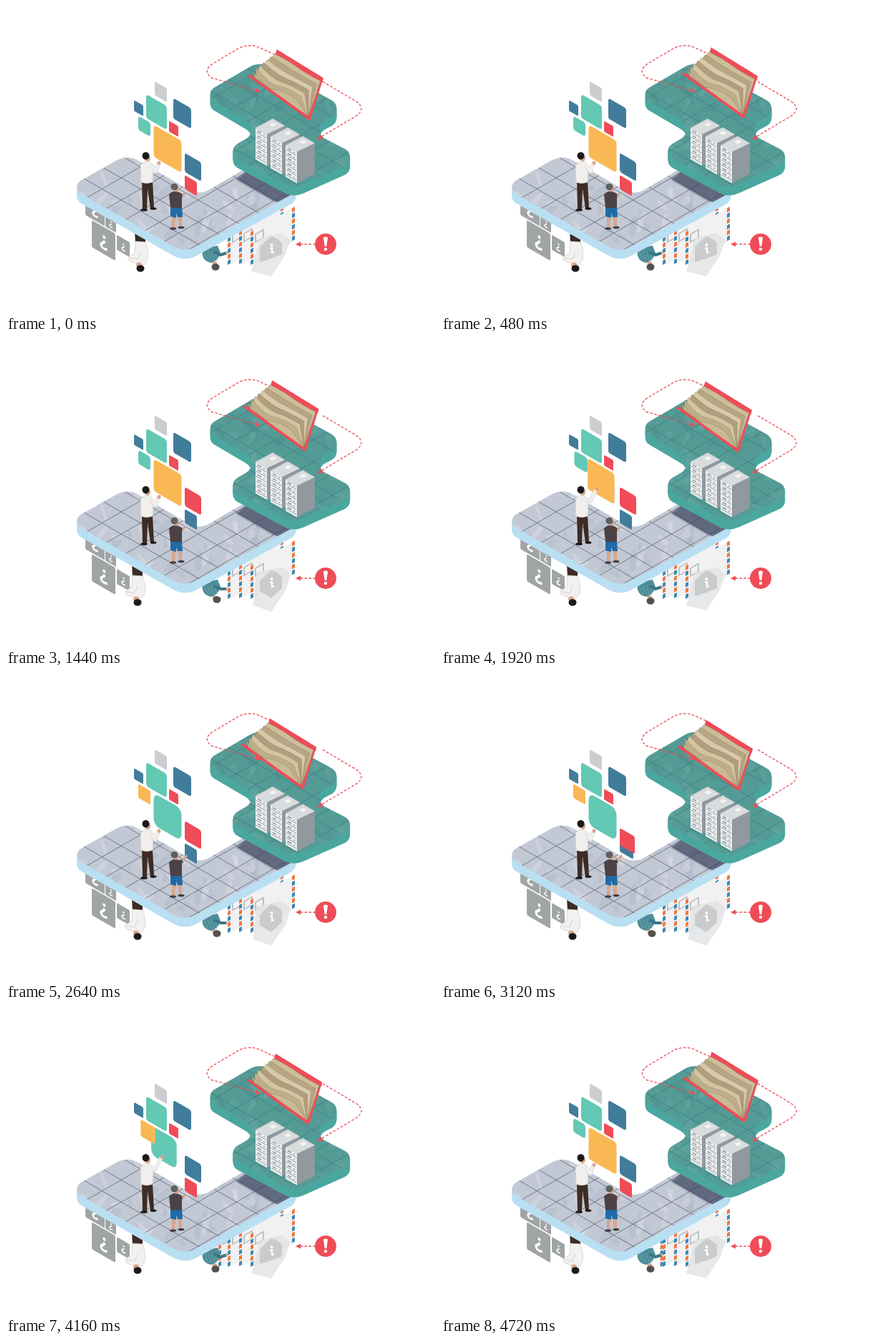
Write an HTML page with a canvas that moves like this. It is 600 px wide and 429 px high and loops after 4.8 s.

```html
<!DOCTYPE html>
<html lang="en">
<head>
<meta charset="utf-8">
<title>Isometric platforms</title>
<style>
html, body { margin: 0; width: 100%; height: 100%; overflow: hidden; background: #fff; }
canvas { display: block; }
</style>
</head>
<body>
<canvas id="stage" width="600" height="429"></canvas>
<script>
const ctx = document.getElementById('stage').getContext('2d');
const LOOP = 4800, STEP = 80, SLOPE = 0.577;
const TEAL = '#63c8b4', BLUE = '#427c9b', RED = '#ef4c57', ORANGE = '#fab854', SKIN = '#d9a58b';

const mix = (a, b, p) => a + (b - a) * p;
const mixAll = (a, b, p) => a.map((v, i) => mix(v, b[i], p));
const smooth = (t, a, b) => {
  const u = Math.min(1, Math.max(0, (t - a) / (b - a)));
  return u * u * (3 - 2 * u);
};
const bump = (t, a, b) => smooth(t, a, a + 240) - smooth(t, b, b + 240);

function seeded(seed) {
  return () => (seed = (seed * 16807) % 2147483647) / 2147483647;
}

function poly(points, fill, stroke, width = 1) {
  ctx.beginPath();
  points.forEach(([x, y]) => ctx.lineTo(x, y));
  ctx.closePath();
  if (fill) { ctx.fillStyle = fill; ctx.fill(); }
  if (stroke) { ctx.strokeStyle = stroke; ctx.lineWidth = width; ctx.stroke(); }
}

function line(points, color, width, dash = []) {
  ctx.beginPath();
  points.forEach(([x, y]) => ctx.lineTo(x, y));
  ctx.strokeStyle = color;
  ctx.lineWidth = width;
  ctx.lineJoin = 'round';
  ctx.setLineDash(dash);
  ctx.stroke();
  ctx.setLineDash([]);
}

function oval(x, y, rx, ry, fill, turn = 0) {
  ctx.beginPath();
  ctx.ellipse(x, y, rx, ry, turn, 0, 7);
  ctx.fillStyle = fill;
  ctx.fill();
}

function shape(d, fill, stroke) {
  const path = new Path2D(d);
  if (fill) { ctx.fillStyle = fill; ctx.fill(path); }
  if (stroke) { ctx.strokeStyle = stroke; ctx.lineWidth = 0.8; ctx.stroke(path); }
}

// Corners are [x, y, radius]
function rounded(corners) {
  const path = new Path2D(), n = corners.length;
  const [a, b] = [corners[n - 1], corners[0]];
  path.moveTo((a[0] + b[0]) / 2, (a[1] + b[1]) / 2);
  corners.forEach(([x, y, r], i) => {
    const next = corners[(i + 1) % n];
    path.arcTo(x, y, next[0], next[1], r);
  });
  path.closePath();
  return path;
}

// Upright square seen in isometric view
function tile([x, y, w], color, round = 0.12, label) {
  ctx.save();
  ctx.transform(1, SLOPE, 0, 1.155, x, y);
  ctx.beginPath();
  ctx.roundRect(0, 0, w, w, w * round);
  ctx.fillStyle = color;
  ctx.fill();
  if (label) {
    ctx.font = `bold ${w * 0.72}px "Open Sans", sans-serif`;
    ctx.textAlign = 'center';
    ctx.fillStyle = '#fff';
    ctx.fillText(label, w / 2, w * 0.7);
  }
  ctx.restore();
}

const floor = rounded([[88, 254, 11], [170, 208, 30], [270, 266, 28], [352, 218, 8],
  [424, 251, 15], [250, 346, 32]]);
const deck = rounded([[275, 124, 11], [355, 77, 30], [477, 144, 13], [421, 173, 15],
  [498, 213, 13], [402, 256, 32], [305, 204, 12], [358, 173, 15]]);

function platform(path, look) {
  ctx.save();
  ctx.fillStyle = look.side;
  ctx.translate(0, 13);
  for (let i = 0; i < 13; i++) { ctx.fill(path); ctx.translate(0, -1); }
  ctx.fillStyle = look.top;
  ctx.fill(path);
  ctx.clip(path);
  const rnd = seeded(look.seed);
  for (let i = 0; i < 260; i++) {
    oval(90 + rnd() * 410, 70 + rnd() * 280, 4 + rnd() * 12, 2 + rnd() * 4,
      rnd() < 0.5 ? look.light : look.dark, rnd() * 3);
  }
  for (let c = -300; c < 800; c += 31) {
    for (const s of [-SLOPE, SLOPE]) {
      line([[0, c + look.shift], [600, c + look.shift + s * 600]], look.grid, look.width);
    }
  }
  if (look.shadow) {
    ctx.filter = 'blur(1px)';
    shape('M322 243 L340 229 L425 240 L425 258 L388 274 Q380 277 372 272 Z', 'rgba(56,64,92,.7)');
  }
  ctx.restore();
}

function server(x, y) {
  const at = points => points.map(([a, b]) => [x + a, y + b]);
  poly(at([[0, 13], [24, 0], [41, 10], [16, 22]]), '#d9dcdd', '#c3c7c9', 0.6);
  poly(at([[16, 22], [41, 10], [41, 53], [16, 66]]), '#8f999f');
  poly(at([[0, 13], [16, 22], [16, 66], [0, 57]]), '#eceeee');
  for (let i = 0; i < 6; i++) {
    const h = 17 + i * 7;
    line(at([[1, h + 2], [15, h + 10]]), '#a4abb0', 1.1);
    line(at([[3, h], [8, h + 3]]), '#7d868c', 1.3);
    line(at([[11, h + 5], [13, h + 6]]), '#8f989e', 1.2);
  }
  poly(at([[19, 8], [25, 5], [30, 8], [24, 11]]), '#f2f3f3');
}

function book(x, y) {
  ctx.save();
  ctx.translate(x, y);
  poly([[0, 0], [65, 40], [47, 99], [-14, 50]], '#e9525c');
  poly([[0, 0], [65, 40], [64, 46], [-2, 6]], RED);
  poly([[-41, 37], [-37, 35], [47, 94], [45, 99]], RED);
  const shades = ['#cdbd9b', '#b7a684', '#d8caa9', '#b09e7d', '#d3c4a2', '#bfae8b', '#c9b995'];
  shades.forEach((shade, i) => {
    const p = i / 6;
    const [lx, ly] = mixAll([-3, 6], [-34, 30], p);
    const [rx, ry] = mixAll([61, 44], [28, 70], p);
    const sag = p * 16;
    shape(`M${lx} ${ly} Q${mix(lx, rx, 0.3)} ${mix(ly, ry, 0.25) + sag} ${mix(lx, rx, 0.5)} ${mix(ly, ry, 0.5) + sag * 0.4}
      T${rx} ${ry} L44 95 Q10 70 -30 40 Z`, shade, 'rgba(126,107,78,.45)');
  });
  line([[-38, 37], [45, 96]], RED, 3);
  ctx.restore();
}

function arrow(points, [x, y], angle) {
  const path = new Path2D(points);
  ctx.strokeStyle = RED;
  ctx.lineWidth = 1.3;
  ctx.setLineDash([3.6, 2.4]);
  ctx.stroke(path);
  ctx.setLineDash([]);
  ctx.save();
  ctx.translate(x, y);
  ctx.rotate(angle);
  poly([[2, 0], [-5, -3.5], [-5, 3.5]], RED);
  ctx.restore();
}

function envelope(x, y) {
  ctx.save();
  ctx.transform(1, -SLOPE, 0, 1, x, y);
  ctx.fillStyle = '#f1f1f2';
  ctx.fillRect(0, 0, 62, 48);
  for (const edge of [2, 60]) {
    line([[edge, 0], [edge, 48]], '#fff', 4);
    line([[edge, 0], [edge, 48]], '#ef7643', 4, [6, 10]);
    line([[edge, 8], [edge, 48]], '#3e88b0', 4, [6, 10]);
  }
  ctx.strokeStyle = '#bfc1c3';
  ctx.lineWidth = 2;
  ctx.strokeRect(7, 7, 11, 11);
  ctx.restore();
}

function shield(point) {
  const low = mix(379, 381, point);
  ctx.globalAlpha = 0.8;
  poly([[mix(355, 350, point), 326], [mix(343, 346, point), 372], [371, low],
    [mix(390, 392, point), 350], [398, 328], [385, 318]], '#e2e3e4');
  ctx.globalAlpha = 1;
  shape(`M355 ${mix(359, 352, point)} V338 Q362 330 371 323 Q379 325 386 332 V348
    L371 ${mix(354, 362, point)} Z`, '#c9cbcc');
  oval(371.5, 335, 2, 2, '#fff');
  line([[369, 340], [372, 339], [372, 346], [375, 345]], '#fff', 2.2);
}

function mirrorMan(push) {
  ctx.save();
  ctx.translate(mix(4, 0, push), 0);
  poly([[176, 314], [191, 320], [191, 334], [177, 334]], '#3b2b24');
  shape('M177 330 L191 331 Q196 342 194 356 L189 363 L177 360 Q165 358 167 352 L176 346 Z',
    '#f3f1ef', '#d5d1ce');
  line([[169, 353], [180, 355], [184, 345]], '#cfcac6', 0.8);
  oval(182, 363, 4, 3.5, SKIN);
  oval(184, 368, 5.5, 4.8, '#1d1a1a');
  ctx.restore();
}

function mirrorBoy(raise) {
  shape('M274 340 L296 336 L300 346 Q297 357 287 360 Q277 358 275 350 Z', '#4c8d98');
  for (let i = 0; i < 4; i++) line([[277 + i * 5, 344], [283 + i * 4, 357]], '#76a9b0', 0.8);
  line([[291, 345], [300, 349], [309, mix(346, 349, raise)]], '#397583', 4);
  oval(309, mix(346, 349, raise), 2, 1.8, SKIN);
  oval(292, 361, 3.5, 3, SKIN);
  oval(mix(293, 295, raise), mix(366, 364, raise), 5.5, 4.8, '#54504f');
}

function man(lift) {
  const hand = mixAll([213, 221], [217, 210], lift);
  poly([[190, 245], [205, 246], [207, 283], [202, 284], [198, 256], [197, 285], [191, 285]], '#3d2c24');
  oval(193, 286, 5, 1.8, '#1e1a19');
  oval(206, 284, 4.5, 1.8, '#1e1a19');
  shape('M188 224 Q193 217 199 218 Q206 220 206 228 L205 247 Q196 250 189 247 Z', '#f1efed', '#d6d2cf');
  line([[203, 224], [209, mix(232, 226, lift)], hand], '#d6d2cf', 5.5);
  line([[203, 224], [209, mix(232, 226, lift)], hand], '#f1efed', 4.4);
  oval(hand[0] + 1, hand[1] - 1, 2.4, 2.8, SKIN);
  oval(198, 213, 4, 5, SKIN);
  oval(195.5, 210, 5, 5.3, '#1d1a1a');
}

function boy(lift) {
  const hand = mixAll([250, 262], [253, 254], lift);
  poly([[232, 293], [237, 294], [236, 311], [232, 311]], SKIN);
  poly([[240, 294], [246, 293], [246, 310], [242, 310]], SKIN);
  oval(233.5, 312, 4.5, 1.8, '#413d40');
  oval(245, 310.5, 4.5, 1.8, '#413d40');
  poly([[230, 281], [246, 281], [247, 296], [240, 296], [238, 290], [238, 297], [230, 295]], '#1e6ba6');
  shape('M228 264 Q233 259 239 260 Q246 262 246 267 L246 283 L230 283 Z', '#4c4144');
  line([[242, 264], [247, mix(267, 262, lift)]], '#4c4144', 5);
  line([[247, mix(267, 262, lift)], hand], SKIN, 3);
  oval(238, 256, 4, 4.5, SKIN);
  oval(235.5, 253.5, 5, 4.8, '#62605f');
}

function tiles(t) {
  tile([208, 105.5, 17], '#cccdd0');
  tile([234, 129, 25], BLUE);
  tile([196, 123.5, 29], TEAL);
  tile([179, 132, 13], BLUE);
  tile([228, 161, 13], RED);

  const big = [206.5, 166.5, 39], small = [185, 154, 17];
  const p = smooth(t, 1820, 2460) - smooth(t, 4000, 4640);
  const pair = [
    [mixAll(big, small, p), ORANGE, 0.1],
    [mixAll(small, big, p), TEAL, 0.2]
  ];
  if (t > 3300) pair.reverse();
  pair.forEach(args => tile(...args));

  const upper = [250, 206, 23], lower = [250, 237, 17];
  const q = smooth(t, 810, 1450) - smooth(t, 2880, 3520);
  const swap = [
    [mixAll(lower, upper, q), RED],
    [mixAll(upper, lower, q), BLUE]
  ];
  if (t > 2200) swap.reverse();
  swap.forEach(args => tile(...args));
}

function draw(t) {
  const angle = t / LOOP * Math.PI * 2;
  const boyLift = bump(t, 760, 1240) + bump(t, 2420, 3120);
  const manLift = bump(t, 1680, 2340) + bump(t, 3380, 4380);
  ctx.fillStyle = '#fff';
  ctx.fillRect(0, 0, 600, 429);

  for (const box of [[111, 262, 27], [139, 292, 15], [120, 300, 33], [155, 321, 18]]) {
    tile(box, '#a1a4a5', 0.06, '¿');
  }
  mirrorMan(smooth(t, 600, 1000) - smooth(t, 4400, 4700));
  envelope(mix(310, 297, bump(t, 3850, 4560)), 317);
  envelope(310, 317);
  envelope(326, 316);
  envelope(342, 317);
  mirrorBoy(bump(t, 640, 1500) + bump(t, 2400, 3900));
  shield(bump(t, 640, 1500) + bump(t, 2400, 3900));

  platform(floor, { side: '#b9dff2', top: '#c2c8d4', light: 'rgba(226,230,238,.35)',
    dark: 'rgba(150,160,180,.2)', grid: '#68717f', width: 0.9, shift: 14, seed: 7, shadow: true });
  platform(deck, { side: '#4ba79e', top: '#549b96', light: 'rgba(120,180,173,.2)',
    dark: 'rgba(60,125,122,.18)', grid: '#3c7f7d', width: 0.8, shift: 6, seed: 21 });

  for (let i = 0; i < 3; i++) server(349 + i * 21, 158 + i * 12.3);
  arrow('M376 68 L356 59 Q342 52 326 59 L289 81 Q274 91 288 101 L352 119', [354, 119.5], 0.3);
  arrow('M443 106 L490 134 Q504 144 490 154 L438 185', [437, 186], 2.6);
  arrow('M433 334 H410', [407, 334], Math.PI);
  book(373.8 + 5 * Math.cos(angle), 61 - 4.5 * Math.sin(angle));

  oval(447, 334, 15, 15, RED);
  poly([[444, 325], [450, 325], [448.3, 337], [445.7, 337]], '#fff');
  oval(447, 325.5, 3, 2, '#fff');
  oval(447, 341, 2.2, 2.2, '#fff');

  tiles(t);
  man(manLift);
  boy(boyLift);
}

function tick() {
  const t = performance.now() % LOOP;
  draw(Math.floor(t / STEP) * STEP);
  requestAnimationFrame(tick);
}
tick();
</script>
</body>
</html>
```
